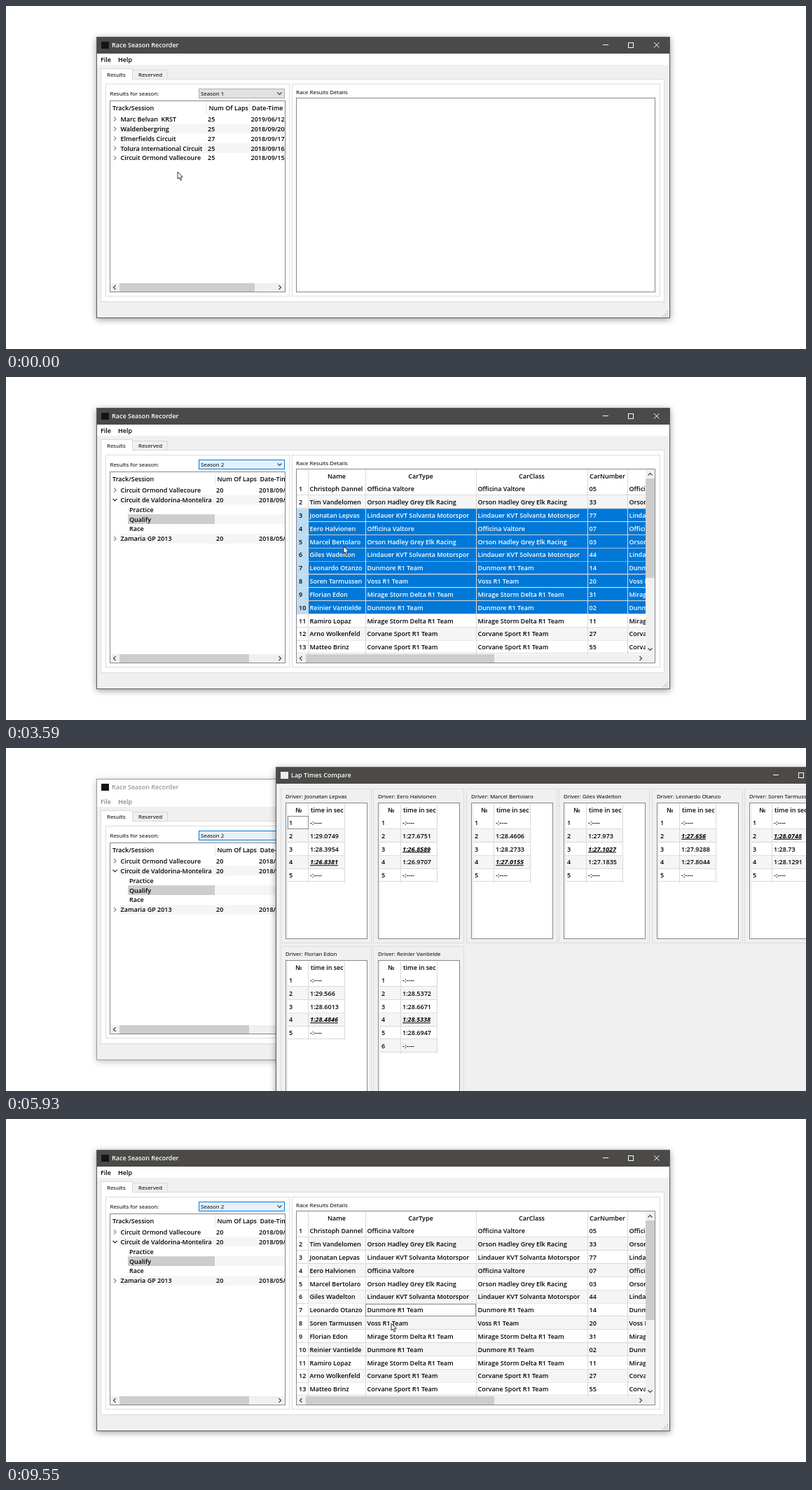
An HTML page with a canvas that plays this animation: 1142 px wide and 490 px high, repeating every 9870 ms.

```html
<!DOCTYPE html>
<html lang="en">
<head>
<meta charset="utf-8">
<title>Lap times</title>
<style>
  html, body { margin: 0; width: 100%; height: 100%; overflow: hidden; background: #fff; }
  canvas { display: block; }
</style>
</head>
<body>
<canvas id="stage" width="1142" height="490"></canvas>
<script>
const LOOP = 9870;
const UI = '600 9px "Open Sans", sans-serif';
const BEST = 'italic 700 9px "Open Sans", sans-serif';
const SMALL = '7.9px "Noto Sans", sans-serif';
const GRID = '#d9d9d9', ALT = '#f5f5f5', FRAME = '#828790', PANEL = '#f0f0f0';

const main = document.getElementById('stage').getContext('2d');
const layerCanvas = document.createElement('canvas');
layerCanvas.width = 1260;
layerCanvas.height = 560;
const layer = layerCanvas.getContext('2d');
let g = main;

const TEAMS = {
  O: 'Officina Valtore', A: 'Orson Hadley Grey Elk Racing', L: 'Lindauer KVT Solvanta Motorspor',
  D: 'Dunmore R1 Team', V: 'Voss R1 Team', M: 'Mirage Storm Delta R1 Team', C: 'Corvane Sport R1 Team'
};
const DRIVERS = [
  ['Christoph Dannel', 'O', '05'], ['Tim Vandelomen', 'A', '33'], ['Joonatan Lepvas', 'L', '77'],
  ['Eero Halvionen', 'O', '07'], ['Marcel Bertolaro', 'A', '03'], ['Giles Wadelton', 'L', '44'],
  ['Leonardo Otanzo', 'D', '14'], ['Soren Tarmussen', 'V', '20'], ['Florian Edon', 'M', '31'],
  ['Reinier Vantielde', 'D', '02'], ['Ramiro Lopaz', 'M', '11'], ['Arno Wolkenfeld', 'C', '27'],
  ['Matteo Brinz', 'C', '55']
];
const LAPS = [
  '1:29.0749 1:28.3954 1:26.8381', '1:27.6751 1:26.8589 1:26.9707', '1:28.4606 1:28.2733 1:27.0155',
  '1:27.973 1:27.1027 1:27.1835', '1:27.656 1:27.9288 1:27.8044', '1:28.0748 1:28.73 1:28.1291',
  '1:29.566 1:28.6013 1:28.4846', '1:28.5372 1:28.6671 1:28.5338 1:28.6947'
].map(s => s.split(' '));
const SEASON1 = [
  ['Marc Belvan  KRST', 25, '2019/06/12'], ['Waldenbergring', 25, '2018/09/20'],
  ['Elmerfields Circuit', 27, '2018/09/17'], ['Tolura International Circuit', 25, '2018/09/16'],
  ['Circuit Ormond Vallecoure', 25, '2018/09/15']
];
const SEASON2 = [
  ['Circuit Ormond Vallecoure', 20, '2018/09/14'], ['Circuit de Valdorina-Montelira', 20, '2018/09/10'],
  ['Zamaria GP 2013', 20, '2018/05/20']
];
const SESSIONS = [['Practice'], ['Qualify'], ['Race']];

// Moments at which the user's actions take effect
const T = { hover: 480, popup: 560, season: 1130, expand: 1750, pick: 2420, table: 2500, drag: 3130,
  dragEnd: 3420, open: 4300, resize: 5230, release: 6900, close: 8400, clear: 9470 };

const POINTER = [[70, 245, 237], [500, 340, 123], [580, 340, 123], [900, 318, 148], [1130, 315, 147],
  [1510, 260, 163], [1750, 240, 175], [2050, 215, 196], [2400, 207, 202], [2500, 207, 202], [3050, 470, 196],
  [3130, 470, 197], [3420, 484, 329], [3590, 482, 242], [4060, 491, 231], [5010, 491, 231], [5230, 637, 363],
  [6900, 637, 468], [7480, 615, 50], [7550, 615, 50], [7710, 501, 60], [7790, 501, 60], [8300, 1056, 49],
  [8470, 1056, 49], [9320, 549, 274], [9470, 549, 275], [9550, 550, 292]];
const WINDOW_POS = [[7480, 385, 27], [7550, 385, 27], [7710, 271, 37]];
const WINDOW_HEIGHT = [[5380, 336], [5930, 484], [6389, 484], [6390, 478], [6540, 476], [6900, 441]];

const clamp = v => Math.max(0, Math.min(1, v));
const managerActive = t => t < T.open || t >= T.close;

function track(keys, t) {
  const i = keys.findIndex(k => k[0] > t);
  if (i < 0) return keys[keys.length - 1].slice(1);
  if (i === 0) return keys[0].slice(1);
  const a = keys[i - 1], b = keys[i];
  const p = (t - a[0]) / (b[0] - a[0]), e = p * p * (3 - 2 * p);
  return a.slice(1).map((v, k) => v + (b[k + 1] - v) * e);
}

function fill(x, y, w, h, color) {
  g.fillStyle = color;
  g.fillRect(x, y, w, h);
}
function box(x, y, w, h, line, color) {
  if (color) fill(x, y, w, h, color);
  g.strokeStyle = line;
  g.lineWidth = 1;
  g.strokeRect(x + .5, y + .5, w - 1, h - 1);
}
function path(points, color, width = 1) {
  g.beginPath();
  points.forEach(([x, y]) => g.lineTo(x, y));
  g.strokeStyle = color;
  g.lineWidth = width;
  g.stroke();
}
function text(s, x, y, color = '#000', font = UI, align = 'left') {
  g.font = font;
  g.fillStyle = color;
  g.textAlign = align;
  g.fillText(s, x, y + (font === SMALL ? 2.8 : 3.3));
}
function clip(x, y, w, h, draw) {
  g.save();
  g.beginPath();
  g.rect(x, y, w, h);
  g.clip();
  draw();
  g.restore();
}
// Arrow head pointing right, turned by quarter turns
function chevron(x, y, turns, color = '#444', r = 3) {
  g.save();
  g.translate(x, y);
  g.rotate(turns * Math.PI / 2);
  path([[-r / 2, -r], [r / 2, 0], [-r / 2, r]], color, 1.2);
  g.restore();
}
function hScroll(x, w, y, from, to) {
  fill(x, y, w, 12, PANEL);
  fill(from, y, to - from, 12, '#cdcdcd');
  chevron(x + 6, y + 6, 2);
  chevron(x + w - 7, y + 6, 0);
}
function vScroll(x, y, h, from, to) {
  fill(x, y, 13, h, PANEL);
  fill(x, from, 13, to - from, '#cdcdcd');
  chevron(x + 6.5, y + 7, 3);
  chevron(x + 6.5, y + h - 7, 1);
}

function windowFrame(w, h, title, active, icon) {
  g.save();
  g.shadowColor = active ? 'rgba(0,0,0,.4)' : 'rgba(0,0,0,.25)';
  g.shadowBlur = 9;
  g.shadowOffsetY = 2;
  fill(0, 0, w, h, PANEL);
  g.restore();
  fill(0, 0, w, 24, active ? '#4b4a48' : '#fff');
  box(0, 0, w, h, active ? '#5a5a5a' : '#999');
  fill(7, 7, 11, 10, icon);
  const ink = active ? '#fff' : '#999';
  text(title, 22, 12, ink);
  path([[w - 96, 11.5], [w - 88, 11.5]], ink);
  box(w - 60, 8, 8, 8, ink);
  path([[w - 23, 8], [w - 15.5, 15.5]], ink);
  path([[w - 15.5, 8], [w - 23, 15.5]], ink);
}

function drawTree(t, [px, py]) {
  const second = t >= T.season, open = t >= T.expand;
  const lapsX = second ? 298 : 286, dateX = second ? 358.5 : 347;
  const rows = second ? SEASON2.slice() : SEASON1;
  if (open) rows.splice(2, 0, ...SESSIONS);
  box(148, 135, 251, 274, FRAME, '#fff');
  clip(149, 136, 249, 272, () => {
    text('Track/Session', 152, 145.5);
    text('Num Of Laps', lapsX + 3.5, 145.5);
    text('Date-Time', dateX + 4, 145.5);
    for (const x of [lapsX, dateX]) fill(x, 137, 1, 17, '#e5e5e5');
    const popupOpen = t >= T.popup && t < T.season;
    const hovered = px > 149 && px < 398 && !popupOpen ? Math.floor((py - 154.5) / 13.9) : -1;
    rows.forEach(([name, laps, date], i) => {
      const y = 161.5 + 13.9 * i, child = laps === undefined;
      const back = i === hovered ? '#e5f3ff' : i % 2 ? ALT : '#fff';
      fill(child ? 174 : 162, y - 7, 240, 13.9, back);
      if (name === 'Qualify' && t >= T.pick)
        fill(174, y - 7, 124, 13.9, t < T.drag ? '#cce8ff' : '#cdcdcd');
      if (!child) {
        const expanded = open && i === 1;
        chevron(155.5, y, expanded ? 1 : 0, expanded ? '#222' : '#888');
      }
      text(name, child ? 176 : 163.5, y);
      if (!child) {
        text(laps, lapsX + 2, y);
        text(date, dateX + 2.5, y);
      }
    });
    hScroll(149, 249, 396, 162, second ? 347 : 355);
  });
}

function drawCombo(t) {
  const hot = t >= T.hover;
  box(275, 118, 123, 14, hot ? '#0078d7' : '#adadad', hot ? '#e5f1fb' : '#e1e1e1');
  text(t < T.season ? 'Season 1' : 'Season 2', 278, 125, '#000', SMALL);
  chevron(390.5, 125, 1);
}

function drawPopup([, py]) {
  box(275, 131, 123, 25, '#777', '#fff');
  const current = py > 143 ? 1 : 0;
  fill(276, 132 + 11.5 * current, 121, 11.5, '#0078d7');
  for (const i of [0, 1])
    text('Season ' + (i + 1), 278, 138 + 11.5 * i, i === current ? '#fff' : '#000', SMALL);
}

function drawResults(t, [, py]) {
  box(414, 131, 513, 278, FRAME, '#fff');
  if (t < T.table) return;
  const rowH = 18.83, top = 150.6, cols = [431, 513, 671, 830, 887];
  const rowAt = Math.floor((py - top) / rowH);
  const lastSelected = t < T.drag || t >= T.clear ? -1 : t < T.dragEnd ? Math.min(9, rowAt) : 9;
  // The selection turns pale while the other window has the focus
  const [mark, markInk] = managerActive(t) ? ['#0078d7', '#fff'] : [PANEL, '#000'];
  clip(415, 132, 498, 264, () => {
    ['Name', 'CarType', 'CarClass', 'CarNumber'].forEach((s, i) =>
      text(s, (cols[i] + cols[i + 1]) / 2, 142, '#000', UI, 'center'));
    DRIVERS.forEach(([name, key, number], i) => {
      const y = top + rowH * i, mid = y + 9.4, team = TEAMS[key];
      const selected = i >= 2 && i <= lastSelected;
      fill(431, y, 482, rowH, selected ? mark : i % 2 ? ALT : '#fff');
      if (selected) fill(415, y, 16, rowH, '#bcdcf4');
      fill(415, Math.round(y + rowH) - 1, 498, 1, GRID);
      text(i + 1, 418, mid);
      [name, team, team, number, team].forEach((s, c) =>
        clip(cols[c], y, (cols[c + 1] || 913) - cols[c], rowH, () =>
          text(s, cols[c] + 2.5, mid, selected ? markInk : '#000')));
    });
    for (const x of cols) fill(x, 132, 1, 264, GRID);
    if (t >= T.clear) box(513, 264, 158, 18, '#888');
  });
  vScroll(913, 132, 264, 145, 287);
  fill(913, 396, 13, 12, PANEL);
  hScroll(415, 498, 396, 428, 697);
}

function drawManager(t, pointer) {
  const active = managerActive(t);
  g.save();
  g.translate(129, 44);
  windowFrame(819, 402, 'Race Season Recorder', active, '#151515');
  g.restore();
  fill(130, 68, 817, 16, '#fff');
  const ink = active ? '#000' : '#888';
  text('File', 135, 76.5, ink);
  text('Help', 160, 76.5, ink);
  box(135, 104, 805, 319, '#dcdcdc', '#fff');
  box(180, 91, 51, 14, GRID, PANEL);
  box(135, 89, 46, 16, GRID, '#fff');
  fill(136, 104, 44, 1, '#fff');
  text('Results', 144, 98, '#000', SMALL);
  text('Reserved', 189, 98.5, '#000', SMALL);
  box(142, 111, 263, 304, '#dcdcdc');
  box(408, 111, 526, 304, '#dcdcdc');
  text('Results for season:', 148.5, 125, '#000', SMALL);
  text('Race Results Details', 414, 123, '#000', SMALL);
  drawCombo(t);
  drawTree(t, pointer);
  drawResults(t, pointer);
  if (t >= T.popup && t < T.season) drawPopup(pointer);
  for (let i = 0; i < 3; i++)
    for (let j = 0; j <= i; j++) fill(943 - 3 * j, 436 + 3 * i, 1.5, 1.5, '#b5b5b5');
}

function drawLapTable(i, height) {
  const laps = ['-:----', ...LAPS[i], '-:----'];
  const best = LAPS[i].reduce((a, b) => a < b ? a : b);
  const rowH = 18.75;
  box(7, 31, 130, height + 27, '#dcdcdc');
  text('Driver: ' + DRIVERS[i + 2][0], 14, 42.5, '#000', SMALL);
  box(14, 51, 117, height + 1, FRAME, '#fff');
  clip(15, 52, 115, height - 1, () => {
    text('№', 32.5, 61.5, '#000', UI, 'center');
    text('time in sec', 50, 61.5);
    laps.forEach((lap, r) => {
      const y = 70.5 + rowH * r, mid = y + 9.2, isBest = lap === best;
      if (r % 2) fill(17, y, 81, rowH, ALT);
      fill(17, Math.round(y + rowH) - 1, 82, 1, GRID);
      text(r + 1, 19, mid);
      text(lap, 49, mid, '#000', isBest ? BEST : UI);
      if (isBest) fill(49, mid + 4.3, g.measureText(lap).width, 1, '#000');
    });
    const bottom = rowH * laps.length + 19;
    fill(16, 52, 1, height, '#e5e5e5');
    fill(46, 53, 1, bottom, GRID);
    fill(98, 53, 1, bottom, GRID);
    if (i === 0) box(17, 70, 30, 19, '#888');
    if (bottom > height) vScroll(118, 52, height - 1, 65, 142);
  });
}

function drawCompare(t) {
  const appear = clamp((t - T.open - 60) / 200), leave = clamp((t - T.close) / 200);
  const shown = (1 - (1 - appear) ** 2) * (1 - leave * leave);
  if (!shown) return;
  const [x, y] = track(WINDOW_POS, t), [h] = track(WINDOW_HEIGHT, t);
  const grow = (h - 336) / 2;
  g = layer;
  g.clearRect(0, 0, 1260, 560);
  g.save();
  g.translate(Math.round(x), Math.round(y));
  windowFrame(806, Math.round(h), 'Lap Times Compare', leave === 0, '#e8eef2');
  LAPS.forEach((_, i) => {
    g.save();
    g.translate(Math.round(132.4 * (i % 6)), i < 6 ? 0 : Math.round(151 + grow));
    drawLapTable(i, Math.round(120 + grow));
    g.restore();
  });
  g.restore();
  g = main;
  const cx = x + 403, cy = y + h / 2, scale = .95 + .05 * shown;
  g.save();
  g.globalAlpha = shown;
  g.translate(cx, cy);
  g.scale(scale, scale);
  g.drawImage(layerCanvas, -cx, -cy);
  g.restore();
}

function drawPointer(t, [x, y]) {
  const resizing = t >= T.resize - 40 && t < T.release;
  const shape = resizing
    ? [[0, -8], [4, -4], [1, -4], [1, 4], [4, 4], [0, 8], [-4, 4], [-1, 4], [-1, -4], [-4, -4]]
    : [[0, 0], [0, 10], [2.3, 8], [4, 12], [5.8, 11.2], [4.1, 7.4], [7.2, 7.2]];
  if (resizing) {
    x = 637;
    y = 27 + track(WINDOW_HEIGHT, t)[0];
  }
  g.beginPath();
  shape.forEach(([dx, dy]) => g.lineTo(x + dx, y + dy));
  g.closePath();
  g.fillStyle = '#fff';
  g.fill();
  g.strokeStyle = '#222';
  g.lineWidth = .9;
  g.stroke();
}

function render() {
  const t = performance.now() % LOOP, pointer = track(POINTER, t);
  fill(0, 0, 1142, 490, '#fff');
  drawManager(t, pointer);
  drawCompare(t);
  drawPointer(t, pointer);
  requestAnimationFrame(render);
}
render();
</script>
</body>
</html>
```
